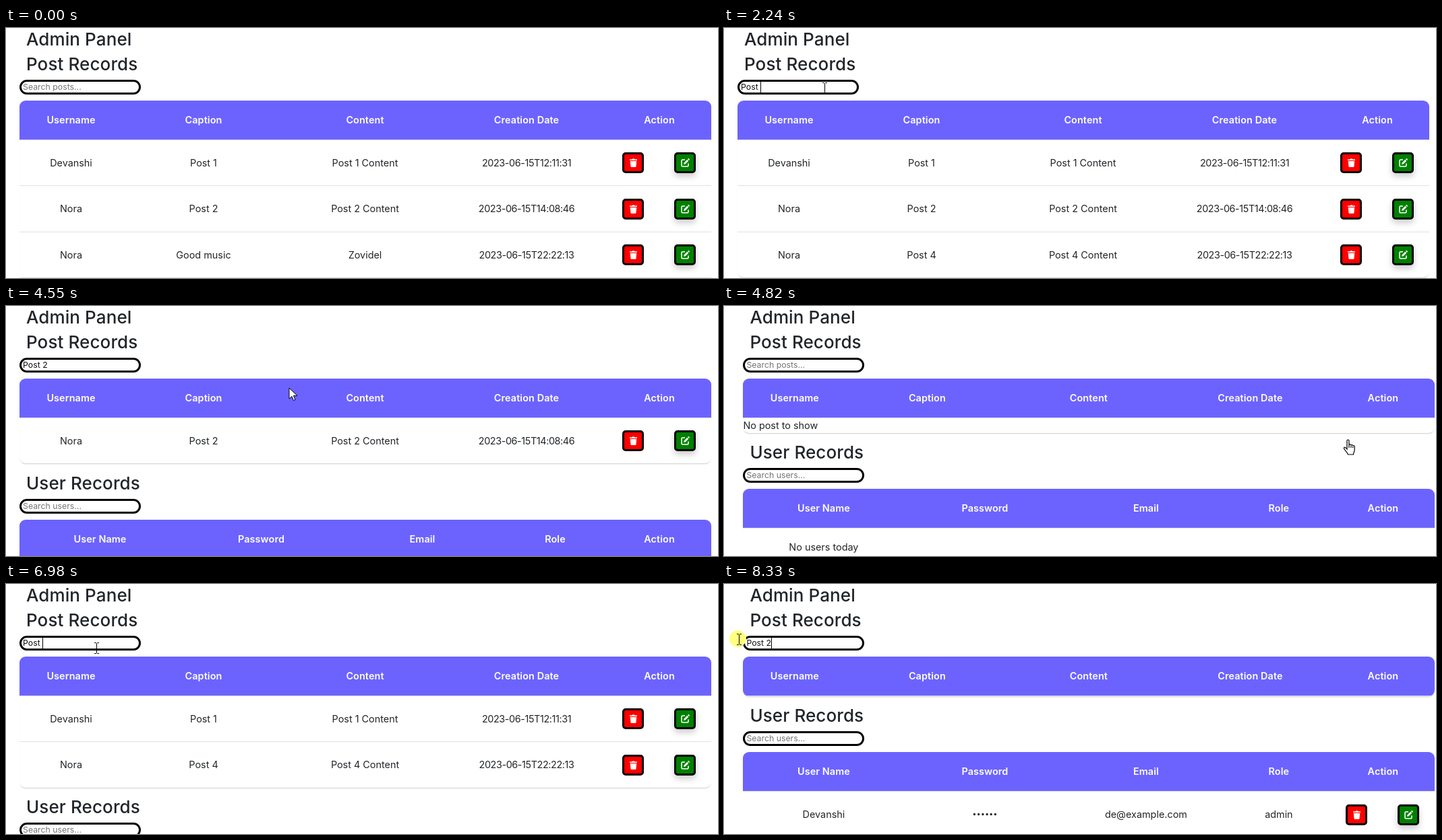
These frames come from a looping animation (1056x372 px, 8400 ms). An HTML page:

```html
<!DOCTYPE html>
<html lang="en">
<head>
<meta charset="utf-8">
<title>Admin Panel</title>
<style>
  html, body { margin: 0; width: 100%; height: 100%; overflow: hidden; background: #fff; }
  body { position: relative; font: 14.4px Inter, "Open Sans", sans-serif; color: #212529; }
  #page { position: absolute; top: -2.5px; left: 20px; width: 1026px; }
  #page.wide { left: 28.4px; }
  h2 { margin: 0; padding-left: 10px; font-size: 26px; font-weight: 500; line-height: 37px; letter-spacing: .1px; }
  .search {
    box-sizing: border-box; width: 180px; height: 22px; margin: 5px 0 9px; padding-left: 2px;
    border: 3px solid #000; border-radius: 11px; font-size: 12.3px; line-height: 16px;
    white-space: pre; color: #111;
  }
  .hint { color: #757575; }
  .caret { display: inline-block; width: 1px; height: 16px; margin-right: -1px; background: #000; vertical-align: top; }
  .table { border-radius: 9px; overflow: hidden; box-shadow: 0 2px 2px -1px rgba(0, 0, 0, .2); margin-bottom: 10.5px; }
  .row { display: grid; text-align: center; height: 67.5px; line-height: 67.5px; border-bottom: 1px solid #dee2e6; }
  .row:last-child { border: 0; }
  .table .head {
    height: 58px; line-height: 57px; border-bottom: 1px solid #dee2e6;
    background: #6c63ff padding-box; color: #fff; font-weight: 600; letter-spacing: .1px;
  }
  .posts .row { grid-template-columns: 153px 240px 239px 240px 154px; }
  .users .row { grid-template-columns: 239px 239px 239px 155px 154px; }
  .date { letter-spacing: -.4px; }
  .secret { font-size: 11px; }
  .empty { height: 22px; line-height: 22px; }
  .users .empty { width: 239px; height: 55px; line-height: 55px; text-align: center; }
  .actions { position: relative; }
  .btn {
    position: absolute; top: 18.5px; left: 22px; box-sizing: border-box; width: 32px; height: 31px;
    border: 3px solid #000; border-radius: 5px; background: #f00;
    display: flex; align-items: center; justify-content: center;
  }
  .btn.edit { left: 99px; background: #008000; box-shadow: 0 5px 10px rgba(0, 0, 0, .2); }
  #pointer { position: absolute; inset: 0; width: 1056px; height: 372px; }
</style>
</head>
<body>
<div id="page"></div>
<svg id="pointer"></svg>
<script>
const LOOP = 8400;

const posts = [
  ['Devanshi', 'Post 1', 'Post 1 Content', '2023-06-15T12:11:31'],
  ['Nora', 'Post 2', 'Post 2 Content', '2023-06-15T14:08:46'],
  ['Nora', 'Good music', 'Zovidel', '2023-06-15T22:22:13'],
  ['Nora', 'Post 4', 'Post 4 Content', '2023-06-15T22:22:13'],
  ['Nora', 'Trip plan', 'Trip Content', '2023-06-15T22:22:13']
];
const users = [['Devanshi', '••••••', 'de@example.com', 'admin']];

// Each entry: start time in ms and the properties that change then.
const timeline = [
  [0, { text: '', caret: false, deleted: false, loaded: true, pointer: null }],
  [200, { pointer: ['arrow', 420, 146] }],
  [270, { pointer: ['arrow', 330, 128] }],
  [340, { pointer: ['arrow', 230, 105] }],
  [410, { pointer: ['beam', 149, 89] }],
  [540, { caret: true }],
  [610, { text: 'P' }],
  [810, { text: 'Po' }],
  [1180, { text: 'Pos' }],
  [1580, { text: 'Post' }],
  [2110, { caret: false }],
  [2240, { text: 'Post ', caret: true }],
  [2500, { text: 'Post 2' }],
  [3030, { caret: false }],
  [3560, { caret: true }],
  [4090, { caret: false }],
  [4550, { pointer: ['arrow', 420, 122] }],
  [4620, { pointer: ['arrow', 760, 172], caret: true }],
  [4690, { pointer: ['hand', 925, 199], caret: false }],
  [4820, { text: '', deleted: true, loaded: false }],
  [4890, { loaded: true }],
  [5840, { pointer: ['beam', 134, 95], caret: true }],
  [6300, { text: 'P' }],
  [6630, { text: 'Po' }],
  [6700, { text: 'Pos' }],
  [6910, { text: 'Post' }],
  [6980, { text: 'Post ' }],
  [7050, { text: 'Post 2' }],
  [7580, { caret: false }],
  [8120, { caret: true, pointer: ['beam', 119, 93] }],
  [8190, { pointer: ['beam', 82, 89] }],
  [8260, { pointer: ['beam', 44, 85] }],
  [8330, { pointer: ['beam', 22, 82, true] }]
];

const trash = `<svg width="11" height="13" fill="#fff"><path d="M0 1.5h3.5l.6-1h2.8l.6 1H11v1.6H0z
  M.8 4h9.4l-.7 8a1.2 1.2 0 0 1-1.2 1H2.7a1.2 1.2 0 0 1-1.2-1z"/></svg>`;
const pencil = `<svg width="13" height="13" fill="#fff"><path fill="none" stroke="#fff" stroke-width="1.6"
  d="M6 2H2.5A1.5 1.5 0 0 0 1 3.5v7A1.5 1.5 0 0 0 2.5 12h7a1.5 1.5 0 0 0 1.5-1.5v-3"/>
  <path d="M4 9l.6-2.6 4.7-4.7 2 2-4.7 4.7zM10 1l.8-.7q.5-.4 1 0l.9.9q.4.5 0 1l-.7.8z"/></svg>`;
const actions = `<div class="actions"><div class="btn">${trash}</div><div class="btn edit">${pencil}</div></div>`;

const shapes = {
  arrow: '<path d="M0 0v16l4-3.5 2.5 6 2.5-1-2.5-6H12z" fill="#fff" stroke="#000"/>',
  beam: '<path d="M-3 -7.5h2.5l1 1 1-1H4M-3 8.5h2.5l1-1 1 1H4M.5 -6.5v14" fill="none" stroke="#000"/>',
  hand: `<path transform="translate(-7 -1)" fill="#fff" stroke="#000" stroke-width="1.2"
    d="M6 15V2.5a1.5 1.5 0 0 1 3 0V9c0-1.5 3-1.5 3 .5 0-1.4 2.7-1.2 2.7.8 0-1.2 2.5-1 2.5.8V16
    c0 3-1.7 4-1.7 7h-8C7 20 1.5 16 1.5 13.5c0-2 2.5-1.5 4.5 1.5zM9 9v4M12 10v3M14.7 11v2"/>`
};

const styleOf = text => /T\d/.test(text) ? 'date' : text.startsWith('•') ? 'secret' : '';
const cell = text => `<div class="${styleOf(text)}">${text}</div>`;
const head = names => `<div class="row head">${names.map(cell).join('')}</div>`;
const row = values => `<div class="row">${values.map(cell).join('')}${actions}</div>`;
const search = (hint, text = '', caret = false) => {
  const bar = caret ? '<span class="caret"></span>' : '';
  return `<div class="search">${text ? text + bar : `${bar}<span class="hint">${hint}</span>`}</div>`;
};

function pageHtml({ text, caret, loaded }, rows) {
  return `<h2>Admin Panel</h2><h2>Post Records</h2>
    ${search('Search posts...', text, caret)}
    <div class="table posts">${head(['Username', 'Caption', 'Content', 'Creation Date', 'Action'])}
      ${loaded ? rows.map(row).join('') : '<div class="empty">No post to show</div>'}</div>
    <h2>User Records</h2>${search('Search users...')}
    <div class="table users">${head(['User Name', 'Password', 'Email', 'Role', 'Action'])}
      ${loaded ? users.map(row).join('') : '<div class="empty">No users today</div>'}</div>`;
}

function pointerHtml(pointer) {
  if (!pointer) return '';
  const [shape, x, y, pressed] = pointer;
  const disc = pressed ? '<circle cx="-1.5" cy="-.5" r="12.5" fill="#ffff80"/>' : '';
  return `<g transform="translate(${x} ${y})">${disc}${shapes[shape]}</g>`;
}

const page = document.getElementById('page');
const pointerLayer = document.getElementById('pointer');
let shown = -1;

function draw() {
  const now = performance.now() % LOOP;
  const step = timeline.filter(([start]) => start <= now).length;
  if (step !== shown) {
    shown = step;
    const state = Object.assign({}, ...timeline.slice(0, step).map(entry => entry[1]));
    const query = state.text.toLowerCase();
    const rows = state.loaded
      ? posts.filter((post, i) => !(state.deleted && i === 1) && post[1].toLowerCase().includes(query))
      : [];
    page.className = rows.length ? '' : 'wide';
    page.innerHTML = pageHtml(state, rows);
    pointerLayer.innerHTML = pointerHtml(state.pointer);
  }
  requestAnimationFrame(draw);
}
draw();
</script>
</body>
</html>
```
